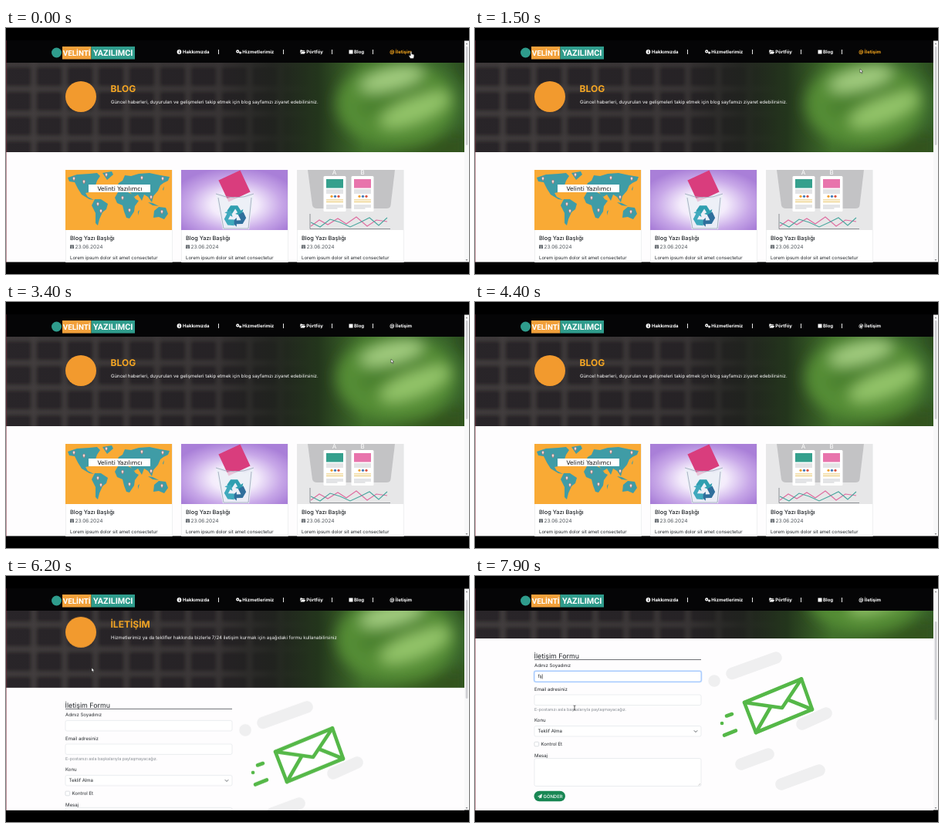
An HTML page for the animation above (8000 ms loop, 600 px wide and 319 px high).

```html
<!DOCTYPE html>
<html lang="tr">
<head>
<meta charset="utf-8">
<title>Blog ve İletişim</title>
<style>
  html, body { margin: 0; width: 100%; height: 100%; overflow: hidden; background: #000; }
  svg { display: block; width: 100vw; height: 100vh; }
  text { font-family: Inter, "Open Sans", sans-serif; font-size: 6.05px; fill: #212529; text-rendering: geometricPrecision; }
  .nav text, .brand { font-weight: 700; fill: #fff; }
  .brand { font: 700 9.8px Roboto, "Liberation Sans", sans-serif; text-anchor: middle; }
  .brand .wide { font-size: 10.8px; }
  .head { font-size: 12px; font-weight: 700; fill: #f5a623; }
  .lead { fill: #fff; }
  .title { font-size: 7.4px; font-weight: 500; }
  .date { font-size: 6.6px; fill: #50565c; }
  .small { font-size: 5.4px; fill: #858b91; }
  .field { fill: #fff; stroke: #dee2e6; stroke-width: .6; }

  /* One shared 8 s timeline: 1% = 80 ms */
  .move, .scroll, .thumb, .link { animation: 8s linear infinite; }
  .cut { animation: 8s steps(1, end) infinite; }
  .move { animation-name: move; }
  .scroll { animation-name: scroll; }
  .thumb { animation-name: thumb; }
  .link { animation-name: link; }
  .blog { animation-name: blog; }
  .contact { animation-name: contact; }
  .hand { animation-name: hand; }
  .arrow { animation-name: arrow; }
  .beam { animation-name: beam; }
  .focus { animation-name: focus; }
  .key1 { animation-name: key1; }
  .key2 { animation-name: key2; }

  @keyframes move {
    0%, 9% { transform: translate(525px, 31px); }
    16% { transform: translate(509px, 42px); }
    18.75% { transform: translate(499px, 53px); }
    23% { transform: translate(499px, 63px); }
    30%, 46% { transform: translate(499px, 74px); }
    51% { transform: translate(499px, 56px); }
    55%, 57% { transform: translate(499px, 29px); }
    61%, 69% { transform: translate(500.5px, 33px); }
    72% { transform: translate(320px, 78px); }
    76%, 79% { transform: translate(111px, 119px); }
    86%, 91% { transform: translate(117px, 131px); }
    98%, 100% { transform: translate(129px, 171px); }
  }
  @keyframes scroll {
    0%, 76% { transform: translateY(0); }
    77.5% { transform: translateY(-16px); }
    83%, 100% { transform: translateY(-80px); }
  }
  @keyframes thumb {
    0%, 76% { transform: translateY(0); }
    77.5% { transform: translateY(7px); }
    83%, 100% { transform: translateY(35px); }
  }
  @keyframes link {
    0%, 18.8% { fill: #f5a61d; }
    21.5%, 56% { fill: #fff; }
    58%, 69.5% { fill: #f5a61d; }
    72%, 100% { fill: #fff; }
  }
  @keyframes blog { 0% { opacity: 1; } 61.25%, 100% { opacity: 0; } }
  @keyframes contact { 0% { opacity: 0; } 61.25%, 100% { opacity: 1; } }
  @keyframes hand { 0% { opacity: 1; } 16.25% { opacity: 0; } 56.25% { opacity: 1; } 70%, 100% { opacity: 0; } }
  @keyframes arrow { 0% { opacity: 0; } 16.25% { opacity: 1; } 56.25% { opacity: 0; } 70% { opacity: 1; } 85%, 100% { opacity: 0; } }
  @keyframes beam { 0% { opacity: 0; } 85%, 100% { opacity: 1; } }
  @keyframes focus { 0% { opacity: 0; } 87.5%, 100% { opacity: 1; } }
  @keyframes key1 { 0% { opacity: 0; } 92.5% { opacity: 1; } 96.25%, 100% { opacity: 0; } }
  @keyframes key2 { 0% { opacity: 0; } 96.25%, 100% { opacity: 1; } }
</style>
</head>
<body>
<svg viewBox="0 0 600 319" preserveAspectRatio="none">
  <defs>
    <clipPath id="page"><rect y="16" width="594" height="287.5"/></clipPath>
    <clipPath id="hero"><rect y="45" width="594" height="116"/></clipPath>
    <filter id="soft" x="-20%" y="-20%" width="140%" height="140%"><feGaussianBlur stdDeviation="2.8"/></filter>
    <filter id="haze" x="-50%" y="-50%" width="200%" height="200%"><feGaussianBlur stdDeviation="9"/></filter>
    <pattern id="keys" width="40" height="32" patternUnits="userSpaceOnUse" patternTransform="translate(-4 47)">
      <rect width="40" height="32" fill="#474243"/>
      <rect x="3" y="3" width="34" height="26" rx="4" fill="#2b2829"/>
    </pattern>
    <linearGradient id="shade">
      <stop offset="0" stop-color="#1d1b1c" stop-opacity=".1"/>
      <stop offset=".45" stop-color="#1d1b1c" stop-opacity=".3"/>
      <stop offset=".58" stop-color="#1f221d" stop-opacity=".85"/>
      <stop offset=".68" stop-color="#23351c"/>
      <stop offset=".78" stop-color="#3f6e2a"/>
      <stop offset="1" stop-color="#35602a"/>
    </linearGradient>
    <radialGradient id="lilac" cx=".5" cy=".58" r=".62">
      <stop offset="0" stop-color="#fff"/>
      <stop offset=".35" stop-color="#f3ebfb"/>
      <stop offset=".7" stop-color="#c8a8e8"/>
      <stop offset="1" stop-color="#a97fd8"/>
    </radialGradient>
    <path id="pin" d="M0 3C-2.2 0-1.5-1.8 0-1.8S2.2 0 0 3Z" fill="#f3e6e6" stroke="#c0605c" stroke-width=".6"/>
    <path id="turn" d="M-4.5-11.5H3L6.5-6 9-7.5 7.5-.5.5-2.5 3-4 .5-8-3-2.5-8.5-5.7Z"/>
    <g id="calendar">
      <path d="M0-4.6H5V0H0Z" fill="#50565c"/>
      <path d="M.6-3H4.4M1.2-1.8H3.9M1.2-.8H3.9" stroke="#fff" stroke-width=".5"/>
    </g>
    <g id="cardBody">
      <rect x=".3" y=".3" width="138" height="140" fill="#fff" stroke="#e4e6e8" stroke-width=".6"/>
      <text class="title" x="6" y="91">Blog Yazı Başlığı</text>
      <use href="#calendar" x="6" y="102"/>
      <text class="date" x="12.5" y="102">23.06.2024</text>
      <text x="6" y="116">Lorem ipsum dolor sit amet consectetur</text>
    </g>
    <g id="sheet">
      <rect width="29" height="46" rx="1.5" fill="#fff"/>
      <rect x="3.5" y="4" width="22" height="11.5"/>
      <path d="M3.5 18H25.5M3.5 20H25.5M3.5 22H25.5M3.5 38H25.5M3.5 40H25.5M3.5 42H18" stroke="#b9bbc0" stroke-width=".8"/>
      <path d="M3.5 31H25.5M3.5 33.5H25.5" stroke="#e9c66a" stroke-width="1.2"/>
      <circle cx="10.5" cy="26.3" r="1.6" fill="#f0a030"/>
      <circle cx="15" cy="26.3" r="1.6" fill="#3e79b8"/>
      <circle cx="19.5" cy="26.3" r="1.6" fill="#d9533f"/>
    </g>
  </defs>

  <rect width="600" height="319"/>

  <g clip-path="url(#page)">
    <rect y="16" width="594" height="288" fill="#fefdfe"/>

    <g class="scroll">
      <!-- Hero backdrop -->
      <g clip-path="url(#hero)">
        <rect y="45" width="594" height="116" fill="#2f2c2d"/>
        <rect x="-10" y="36" width="620" height="134" fill="url(#keys)" filter="url(#soft)"/>
        <rect y="45" width="594" height="116" fill="url(#shade)"/>
        <g filter="url(#haze)">
          <ellipse cx="506" cy="98" rx="78" ry="56" fill="#548d35"/>
          <ellipse cx="500" cy="66" rx="42" ry="13" fill="#a3cd80" transform="rotate(-14 500 66)"/>
          <ellipse cx="530" cy="106" rx="48" ry="16" fill="#93c469" transform="rotate(-22 530 106)"/>
          <path d="M455 100L545 74 552 82 465 112Z" fill="#447a2b"/>
          <path d="M470 170L600 130V175Z" fill="#30531f"/>
          <path d="M572 38H612V92Z" fill="#2a4a1e"/>
        </g>
      </g>
      <circle cx="97" cy="89" r="20" fill="#f29a2e"/>

      <!-- Blog page -->
      <g class="cut blog">
        <text class="head" x="135.5" y="83.4">BLOG</text>
        <text class="lead" x="136" y="97.5">Güncel haberleri, duyuruları ve gelişmeleri takip etmek için blog sayfamızı ziyaret edebilirsiniz.</text>
        <use href="#cardBody" x="77" y="184"/>
        <use href="#cardBody" x="227" y="184"/>
        <use href="#cardBody" x="377" y="184"/>

        <rect x="77" y="184" width="138" height="78" fill="#f9aa35"/>
        <g fill="#3f9ca6">
          <path d="M80 194L92 190 108 189 118 188 122 192 118 198 116 204 111 208 108 213 103 214 106 219 114 223 108 222 98 216 93 208 89 200 82 199Z"/>
          <path d="M125 188L137 186 139 190 131 197Z"/>
          <path d="M115 222L123 222 132 228 130 235 125 239 121 248 119 256 116 253 116 240 111 230Z"/>
          <path d="M145 213L156 212 164 216 168 222 172 224 167 231 166 238 160 247 156 246 153 238 151 230 144 227 141 220Z"/>
          <path d="M143 208L146 201 151 198 154 191 162 192 172 189 186 188 200 191 212 193 210 198 204 201 200 204 197 211 191 218 189 226 184 219 179 216 176 224 171 216 166 219 160 212 154 209 148 211Z"/>
          <path d="M192 237L198 232 207 233 210 241 205 248 198 245 191 246ZM171 238L173 236 171 243ZM184 226L190 230 198 231 190 227ZM203 209L205 205 204 211Z"/>
        </g>
        <use href="#pin" x="88" y="195"/><use href="#pin" x="101" y="199"/>
        <use href="#pin" x="130" y="190"/><use href="#pin" x="119" y="228"/>
        <use href="#pin" x="123" y="237"/><use href="#pin" x="151" y="220"/>
        <use href="#pin" x="160" y="236"/><use href="#pin" x="176" y="194"/>
        <use href="#pin" x="203" y="195"/><use href="#pin" x="188" y="219"/>
        <use href="#pin" x="202" y="238"/>
        <rect x="107" y="203" width="80" height="10" fill="#fff"/>
        <text x="147.5" y="210.6" text-anchor="middle" style="font:500 7.6px 'DejaVu Sans',sans-serif;fill:#111">Velinti Yazılımcı</text>

        <rect x="227" y="184" width="138" height="78" fill="url(#lilac)"/>
        <path d="M272 215H321L315 261H281Z" fill="#e4e9f2" opacity=".7"/>
        <rect x="-15.5" y="-15.5" width="31" height="31" fill="#d93d7d" transform="translate(296 205) rotate(-25)"/>
        <path d="M272 216L284 221 297 219 310 222 321 216 315 261H281Z" fill="#eef2f8" opacity=".75"/>
        <path d="M272 215Q297 225 321 215M275 220L282 260H314L318 220" fill="none" stroke="#a9b2c4" stroke-width="1"/>
        <g transform="translate(296.5 244) scale(1.2)">
          <use href="#turn" fill="#2f9fb0"/>
          <use href="#turn" fill="#2f6f9c" transform="rotate(120)"/>
          <use href="#turn" fill="#3fa9bd" transform="rotate(240)"/>
        </g>

        <rect x="377" y="184" width="138" height="78" fill="#e7e7e8"/>
        <path d="M391 184H504L498.500 230Q498 234 493 234H403Q398 234 397 230Z" fill="#c3c3c5"/>
        <text x="425.5" y="190" text-anchor="middle" style="font-size:8px;fill:#fff">A</text>
        <text x="462" y="190" text-anchor="middle" style="font-size:8px;fill:#fff">B</text>
        <use href="#sheet" x="411.5" y="192" fill="#35a08d"/>
        <use href="#sheet" x="447.5" y="192" fill="#e874ac"/>
        <g fill="none" stroke-width="1.1">
          <path d="M394 241V260.5H498" stroke="#777b82" stroke-width=".8"/>
          <path d="M395 257L406 249 417 255 430 247 441 254 454 245 468 257 480 249 494 251" stroke="#df6c9f"/>
          <path d="M395 252L407 258 420 248 433 252 446 258 459 252 471 246 483 256 494 246" stroke="#4aa79f"/>
        </g>
      </g>

      <!-- Contact page -->
      <g class="cut contact">
        <rect y="161" width="594" height="230" fill="#fefdfe"/>
        <text class="head" x="135.5" y="83.4">İLETİŞİM</text>
        <text class="lead" x="136" y="97.5">Hizmetlerimiz ya da teklifler hakkında bizlerle 7/24 iletişim kurmak için aşağıdaki formu kullanabilirsiniz</text>

        <text x="76.5" y="186.5" style="font-size:8.9px">İletişim Formu</text>
        <path d="M77 188.5H293" stroke="#4b4f53" stroke-width=".8"/>
        <text x="77" y="198">Adınız Soyadınız</text>
        <rect class="field" x="77" y="203.5" width="216" height="13.5" rx="2"/>
        <text x="77" y="229">Email adresiniz</text>
        <rect class="field" x="77" y="234" width="216" height="13.5" rx="2"/>
        <text class="small" x="77" y="255.3">E-postanızı asla başkalarıyla paylaşmayacağız.</text>
        <text x="77" y="269.3">Konu</text>
        <rect class="field" x="77" y="274.5" width="216" height="13.5" rx="2"/>
        <text x="81.5" y="283.4">Teklif Alma</text>
        <path d="M283.8 280.3L286 282.5 288.2 280.3" fill="none" stroke="#343a40" stroke-width=".8"/>
        <rect class="field" x="77" y="295.2" width="5.6" height="5.6" rx="1.2" style="stroke:#c3c8ce"/>
        <text x="85.5" y="300.2">Kontrol Et</text>
        <text x="77" y="315">Mesaj</text>
        <rect class="field" x="77" y="316.5" width="216" height="36" rx="2"/>
        <path d="M289.5 351.5L292 349M291 351.5L292 350.5" stroke="#888" stroke-width=".4"/>
        <rect x="76.5" y="358.7" width="40.5" height="13.6" rx="6.8" fill="#198754"/>
        <path d="M81 366L87 362.5 86 368.3 84 367.3 83 368.8V366.8L86 363.8 82.3 366.6Z" fill="#fff"/>
        <text x="88.5" y="367.6" style="fill:#fff;font-weight:500;font-size:5.9px">GÖNDER</text>

        <g class="cut focus">
          <rect x="76.4" y="202.9" width="217.2" height="14.7" rx="2.6" fill="#fff" stroke="#c2dbfe" stroke-width="1.4"/>
          <rect x="77" y="203.5" width="216" height="13.5" rx="2" fill="#fff" stroke="#86b7fe" stroke-width=".7"/>
          <g class="cut key1"><text x="81.5" y="212.4">f</text><path d="M84.2 207.3V213.5" stroke="#222" stroke-width=".6"/></g>
          <g class="cut key2"><text x="81.5" y="212.4">fş</text><path d="M87.3 207.3V213.5" stroke="#222" stroke-width=".6"/></g>
        </g>

        <g fill="none" stroke-linecap="round" stroke-linejoin="round">
          <path d="M310 216H310.1M333 206.5L390 186M424 272L455 258M345 324L380 311M397 350L446 332" stroke="#efeff0" stroke-width="15.5"/>
          <g stroke="#55b848" stroke-width="4.6">
            <path d="M349 244L423 213.5 437 253 364 283Z" fill="#fff"/>
            <path d="M349 244L398 251 423 213.5M364 283L383 250M437 253L407 241"/>
            <path d="M326 261.5L333 259M320 271H320.1M323 286.5L338 280.5"/>
          </g>
        </g>
      </g>
    </g>

    <!-- Fixed navigation -->
    <rect y="16" width="594" height="29" fill="#050506"/>
    <circle cx="65.5" cy="32" r="6.5" fill="#2f9c8c"/>
    <rect x="73" y="24" width="37.5" height="16.5" fill="#f2a03a"/>
    <rect x="110.5" y="24" width="56.5" height="16.5" fill="#2f9c8c"/>
    <text class="brand" x="91.7" y="36">VELİNTİ</text>
    <text class="brand" x="138.7" y="36"><tspan class="wide">YAZILIMCI</tspan></text>
    <g class="nav">
      <circle cx="224.5" cy="31" r="2.9" fill="#fff"/>
      <path d="M224.5 29V29.8M224.5 30.5V32.8" stroke="#050506" stroke-width=".9"/>
      <text x="229" y="33.2">Hakkımızda</text>
      <g fill="none" stroke="#fff">
        <circle cx="300.2" cy="30.4" r="1.4" stroke-width="1.3"/>
        <circle cx="303.6" cy="32" r="1" stroke-width="1.1"/>
      </g>
      <text x="306.3" y="33.2">Hizmetlerimiz</text>
      <path d="M381.3 28.4H383.7L384.5 29.3H387V30.4H382.7L381.3 32.8ZM383 31H388.2L386.7 33.6H381.5Z" fill="#fff"/>
      <text x="389.2" y="33.2">Pörtföy</text>
      <rect x="444.5" y="28.5" width="5" height="5" fill="#fff"/>
      <text x="451" y="33.2">Blog</text>
      <path d="M275.5 28V34M359.5 28V34M422.5 28V34M475.5 28V34" stroke="#fff" stroke-width=".9"/>
      <text class="link" x="497.3" y="33" style="font-size:6.3px">@</text>
      <text class="link" x="504.8" y="33.2">İletişim</text>
    </g>
    <rect y="16" width=".9" height="288" fill="#7c2438" opacity=".55"/>
  </g>

  <!-- Scrollbar -->
  <rect x="594" y="16.500" width="6" height="287" fill="#f8f8f9"/>
  <rect class="thumb" x="595.7" y="24" width="2.8" height="128" rx="1.4" fill="#cfcfd3"/>
  <path d="M595.6 21.2L597 19.2 598.4 21.2ZM595.6 300L597 302 598.4 300Z" fill="#88888b"/>

  <!-- Pointer -->
  <g class="move">
    <path class="cut hand" d="M-.8 0Q0-1 .8 0V2.7L3.8 3.5V6L3 8.5H-1L-3 5Q-2.5 4-.8 5Z" fill="#fff" stroke="#222" stroke-width=".5"/>
    <path class="cut arrow" d="M0 0V5L1.1 4 2 6 2.9 5.6 2 3.7H3.6Z" fill="#fff" stroke="#222" stroke-width=".5"/>
    <path class="cut beam" d="M-1.4-3Q0-3 0-2.3 0-3 1.4-3M0-2.3V2.3M-1.4 3Q0 3 0 2.3 0 3 1.4 3" fill="none" stroke="#222" stroke-width=".7"/>
  </g>
</svg>
</body>
</html>
```
